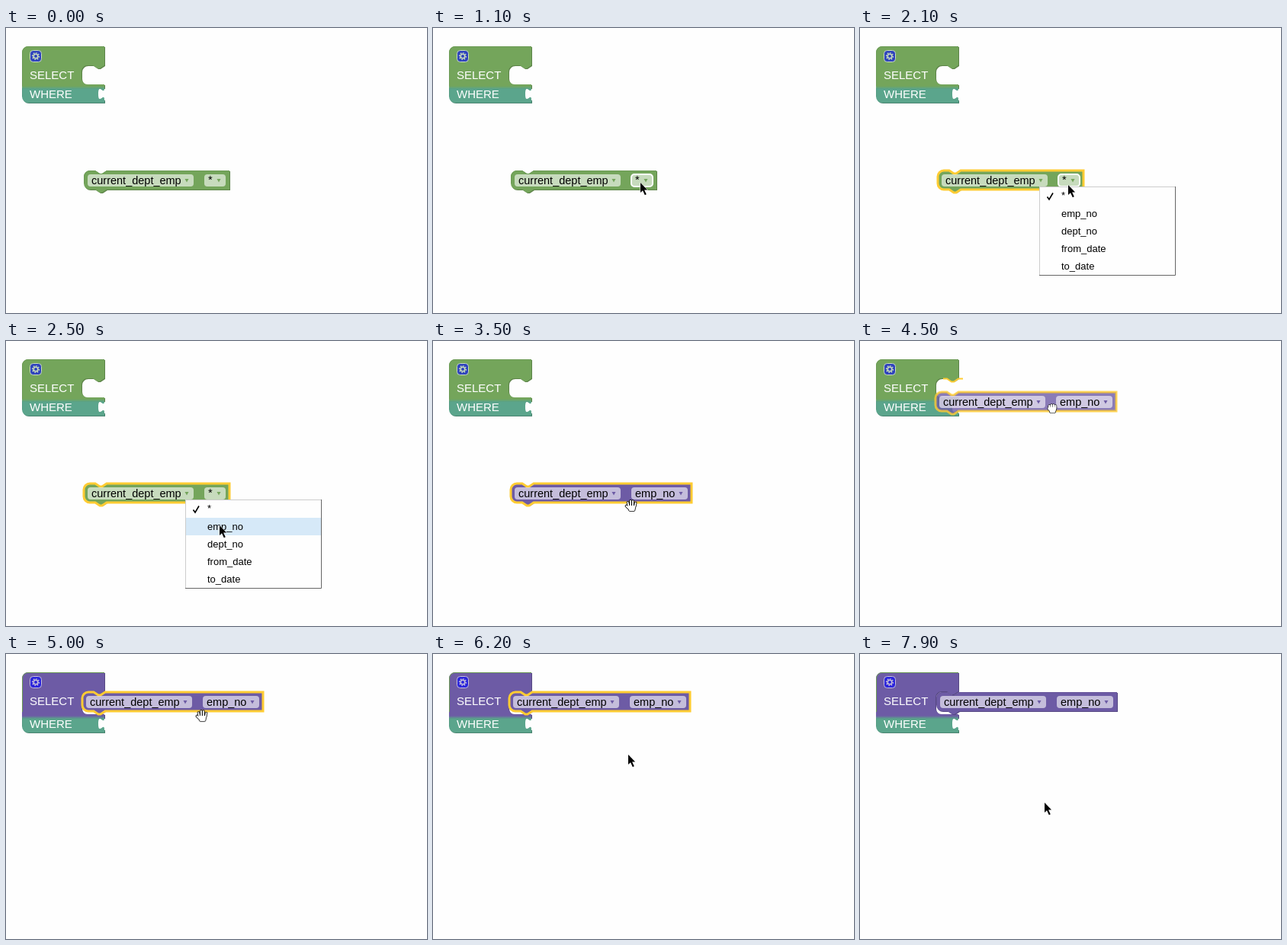
These frames come from a looping animation (552x374 px, 8 s). An HTML page:

```html
<!DOCTYPE html>
<html lang="en">
<head>
<meta charset="utf-8">
<title>Query blocks</title>
<style>
html, body { margin: 0; width: 100%; height: 100%; overflow: hidden; background: #fefefe; }
svg { display: block; width: 552px; height: 374px; font: 14.5px "Liberation Sans", Arial, sans-serif; }

.green { --fill: #74a55b; --dark: #5d8449; --edge: #6b9a54; }
.purple { --fill: #6d5ba5; --dark: #574984; --edge: #665599; }
.teal { --dark: #498470; --edge: #549a82; }
.dark { fill: var(--dark); }
.face { fill: var(--fill); }
.edge { fill: none; stroke: var(--edge); }
.label { fill: #fff; font-size: 15px; }
.pill { fill: #fff; fill-opacity: .6; }
.arrow-down { fill: var(--fill); }

/* 1% = 80 ms; values hold unless a segment sets its own steps() */
.move, .early, .late, .joined, .apart, .where, .child, .child .face, .child .edge,
.dragged-dark, .hover, .menu, .row1, .row2, .notch, .arrow, .hand, .fist {
  animation: 8s step-end -8ms infinite;
}
.move { animation-name: point; }
.child { animation-name: drag; }
.early { animation-name: early; }
.late { animation-name: late; }
.apart { animation-name: apart; }
.joined { animation-name: joined; }
.where { animation-name: where; }
.child .face { animation-name: select; }
.child .edge { animation-name: bevel; }
.child .face.dragged { animation-name: select, fade; }
.dragged-dark { animation-name: dragged-dark; }
.hover { animation-name: hover; }
.menu { animation-name: menu; }
.row1 { animation-name: row1; }
.row2 { animation-name: row2; }
.notch { animation-name: notch; }
.arrow { animation-name: arrow; }
.hand { animation-name: hand; }
.fist { animation-name: fist; }

@keyframes point {
  0% { transform: translate(410px, 111px); }
  3.75% { transform: translate(410px, 111px); animation-timing-function: steps(2); }
  6.25% { transform: translate(383px, 160px); }
  7.5% { transform: translate(354px, 179px); animation-timing-function: steps(5); }
  13.75% { transform: translate(272px, 203px); }
  26.25% { transform: translate(273px, 206px); }
  27.5% { transform: translate(264px, 214px); animation-timing-function: steps(3); }
  31.25% { transform: translate(280px, 242px); }
  38.75% { transform: translate(280px, 242px); animation-timing-function: steps(4); }
  43.75% { transform: translate(260px, 216px); animation-timing-function: steps(2); }
  46.25% { transform: translate(255px, 208px); }
  47.5% { transform: translate(255px, 208px); animation-timing-function: steps(4); }
  52.5% { transform: translate(250px, 131px); animation-timing-function: steps(3); }
  56.25% { transform: translate(252px, 88px); animation-timing-function: steps(2); }
  58.75% { transform: translate(255px, 80px); }
  60% { transform: translate(257px, 75px); }
  61.25% { transform: translate(257px, 75px); animation-timing-function: steps(8); }
  71.25% { transform: translate(256px, 124px); }
  73.75% { transform: translate(256px, 126px); }
  77.5% { transform: translate(256px, 132px); }
  80% { transform: translate(256px, 132px); animation-timing-function: steps(2); }
  82.5% { transform: translate(256px, 139px); }
  83.75% { transform: translate(256px, 139px); animation-timing-function: steps(9); }
  95% { transform: translate(239px, 191px); }
  98.75%, 100% { transform: translate(242px, 195px); }
}
@keyframes drag {
  0% { transform: translate(102px, 187px); }
  47.5% { transform: translate(102px, 187px); animation-timing-function: steps(4); }
  52.5% { transform: translate(98px, 127px); animation-timing-function: steps(3); }
  56.25% { transform: translate(99px, 67px); animation-timing-function: steps(2); }
  58.75% { transform: translate(102px, 59px); }
  60% { transform: translate(104px, 54px); }
  62.5%, 100% { transform: translate(100px, 50px); }
}
@keyframes early { 0% { opacity: 1; } 36.25%, 100% { opacity: 0; } }
@keyframes late { 0% { opacity: 0; } 36.25%, 100% { opacity: 1; } }
@keyframes apart { 0% { opacity: 1; } 62.5%, 100% { opacity: 0; } }
@keyframes joined { 0% { opacity: 0; } 62.5%, 100% { opacity: 1; } }
@keyframes where {
  0% { transform: translateY(76px); }
  62.5%, 100% { transform: translateY(81px); }
}
@keyframes select {
  0%, 78.75%, 100% { stroke: none; }
  18.75% { stroke: #fc3; }
}
@keyframes bevel { 0%, 78.75%, 100% { opacity: 1; } 18.75% { opacity: 0; } }
@keyframes fade {
  0%, 62.5%, 100% { fill-opacity: 1; stroke-opacity: 1; }
  48.75% { fill-opacity: .8; stroke-opacity: .8; }
}
@keyframes dragged-dark { 0%, 62.5%, 100% { opacity: 1; } 48.75% { opacity: 0; } }
@keyframes hover { 0%, 27.5%, 100% { stroke: none; } 12.5% { stroke: #fff; } }
@keyframes menu { 0%, 36.25%, 100% { opacity: 0; } 20% { opacity: 1; } }
@keyframes row1 { 0%, 30%, 100% { opacity: 0; } 27.5% { opacity: 1; } }
@keyframes row2 { 0%, 36.25%, 100% { opacity: 0; } 30% { opacity: 1; } }
@keyframes notch { 0%, 62.5%, 100% { opacity: 0; } 52.5% { opacity: 1; } }
@keyframes arrow { 0%, 43.75% { opacity: 0; } 3.75%, 63.75%, 100% { opacity: 1; } }
@keyframes hand { 0%, 48.75%, 63.75%, 100% { opacity: 0; } 43.75%, 62.5% { opacity: 1; } }
@keyframes fist { 0%, 62.5%, 100% { opacity: 0; } 48.75% { opacity: 1; } }

.child .face { stroke-width: 3; }
.hover { stroke-width: 2; }
.notch { fill: none; stroke: #fc3; stroke-width: 2; }
.menu { font-size: 13px; }
.row1, .row2 { fill: #d6e9f8; }
.outline { fill: #000; stroke: #000; stroke-width: 3.6; }
.inside { fill: #fff; stroke: #fff; stroke-width: 1.9; }
.fist .inside { stroke-width: 2.3; }
.hand, .fist { stroke-linecap: round; stroke-linejoin: round; }
</style>
</head>
<body>
<svg viewBox="0 0 552 374">
  <defs>
    <path id="query" d="M21 32a8 8 0 0 1 8-8H129V49l-6 4-3 0-6-4h-7a8 8 0 0 0-8 8v9a8 8 0 0 0 8 8H129v5H21z"/>
    <path id="query-tall" d="M21 32a8 8 0 0 1 8-8H129V49l-6 4-3 0-6-4h-7a8 8 0 0 0-8 8v14a8 8 0 0 0 8 8H129v5H21z"/>
    <path id="where" d="M21 0H129v3c0 10-8-8-8 7.5s8-2.5 8 7.5v4H29a8 8 0 0 1-8-8z"/>
    <path id="short" d="M0 8a8 8 0 0 1 8-8h7l6 4 3 0 6-4H191v25H30l-6 4-3 0-6-4H8a8 8 0 0 1-8-8z"/>
    <path id="long" d="M0 8a8 8 0 0 1 8-8h7l6 4 3 0 6-4H237v25H30l-6 4-3 0-6-4H8a8 8 0 0 1-8-8z"/>
    <path id="tri" d="M-2.500-2h5l-2.500 4.500z"/>
    <g id="table">
      <rect class="pill" x="5" y="5" width="139" height="16" rx="4"/>
      <text x="10" y="18">current_dept_emp</text>
      <use href="#tri" class="arrow-down" x="135" y="13"/>
    </g>
    <path id="open-hand" d="M-3.500 1L-4.500-4M-1 0V-6.300M2 0V-6M4.800 1L5.600-3.500M-3 4L-6.500 .5M-3 1H4.500L3.500 6H-2z"/>
    <path id="closed-hand" d="M-3.700 0V-3M-1-1V-4M1.800-1V-4M4.400 0V-3M-4.500 1.500V0M-3.500 0H4.500L3 5H-2z"/>
    <linearGradient id="blend" gradientUnits="userSpaceOnUse" x1="0" y1="0" x2="0" y2="4">
      <stop stop-color="#5ba58c" stop-opacity="0"/>
      <stop offset="1" stop-color="#5ba58c"/>
    </linearGradient>
  </defs>

  <g class="green apart">
    <use href="#query" class="dark" x="1" y="1"/>
    <use href="#query" class="face"/>
  </g>
  <g class="purple joined">
    <use href="#query-tall" class="dark" x="1" y="1"/>
    <use href="#query-tall" class="face"/>
  </g>
  <path class="green edge" d="M21.500 76V32a7.500 7.500 0 0 1 7.500-7.500H129"/>
  <g opacity=".6" fill="none" stroke="#fff">
    <rect x="31.500" y="29.500" width="15" height="15" rx="4" fill="#00f"/>
    <circle cx="39" cy="37" r="2.800" stroke-width="1.600"/>
    <circle cx="39" cy="37" r="4.300" stroke-width="1.600" pathLength="16" stroke-dasharray="1"/>
  </g>
  <text class="label" x="31" y="67">SELECT</text>
  <g class="teal where">
    <path class="dark" d="M22 15a8 8 0 0 0 8 8H130v-4H29z"/>
    <use href="#where" fill="url(#blend)"/>
    <path class="edge" d="M21.500 3V14"/>
    <text class="label" x="31" y="16">WHERE</text>
  </g>
  <path class="notch" d="M109 49.500h5l6 4h3l6-4h6"/>

  <g class="child">
    <g class="green early">
      <use href="#short" class="dark" x="1" y="1"/>
      <use href="#short" class="face"/>
      <path class="edge" d="M.5 17V8a7.500 7.500 0 0 1 7.500-7.500h7l6 4h3l6-4H191"/>
      <use href="#table"/>
      <rect class="pill hover" x="158" y="5" width="28" height="16" rx="4"/>
      <text x="163" y="17">*</text>
      <use href="#tri" class="arrow-down" x="177" y="13"/>
    </g>
    <g class="purple late">
      <use href="#long" class="dark dragged-dark" x="1" y="1"/>
      <use href="#long" class="face dragged"/>
      <path class="edge" d="M.5 17V8a7.500 7.500 0 0 1 7.500-7.500h7l6 4h3l6-4H237"/>
      <use href="#table"/>
      <rect class="pill" x="158" y="5" width="74" height="16" rx="4"/>
      <text x="163" y="18">emp_no</text>
      <use href="#tri" class="arrow-down" x="223" y="13"/>
    </g>
  </g>

  <g class="menu">
    <rect x="235" y="208" width="179" height="117" fill="#fefefe"/>
    <rect class="row1" x="236" y="209" width="177" height="23"/>
    <rect class="row2" x="236" y="232" width="177" height="23"/>
    <path d="M235.500 325V208.500H414" fill="none" stroke="#ccc"/>
    <path d="M413.500 208V324.500H235" fill="none" stroke="#666"/>
    <path d="M245.500 221.500l2.500 3.500 5-8.500" fill="none" stroke="#000" stroke-width="1.600"/>
    <text x="264" y="224">*</text>
    <text x="264" y="248">emp_no</text>
    <text x="264" y="271">dept_no</text>
    <text x="264" y="294">from_date</text>
    <text x="264" y="317">to_date</text>
  </g>

  <g class="move">
    <path class="arrow" d="M0 0v13l3-2.800 2.800 6 2-1-2.700-5.600h4z" stroke="#fff" paint-order="stroke"/>
    <g class="hand">
      <use href="#open-hand" class="outline"/>
      <use href="#open-hand" class="inside"/>
    </g>
    <g class="fist">
      <use href="#closed-hand" class="outline"/>
      <use href="#closed-hand" class="inside"/>
    </g>
  </g>
</svg>
</body>
</html>
```
